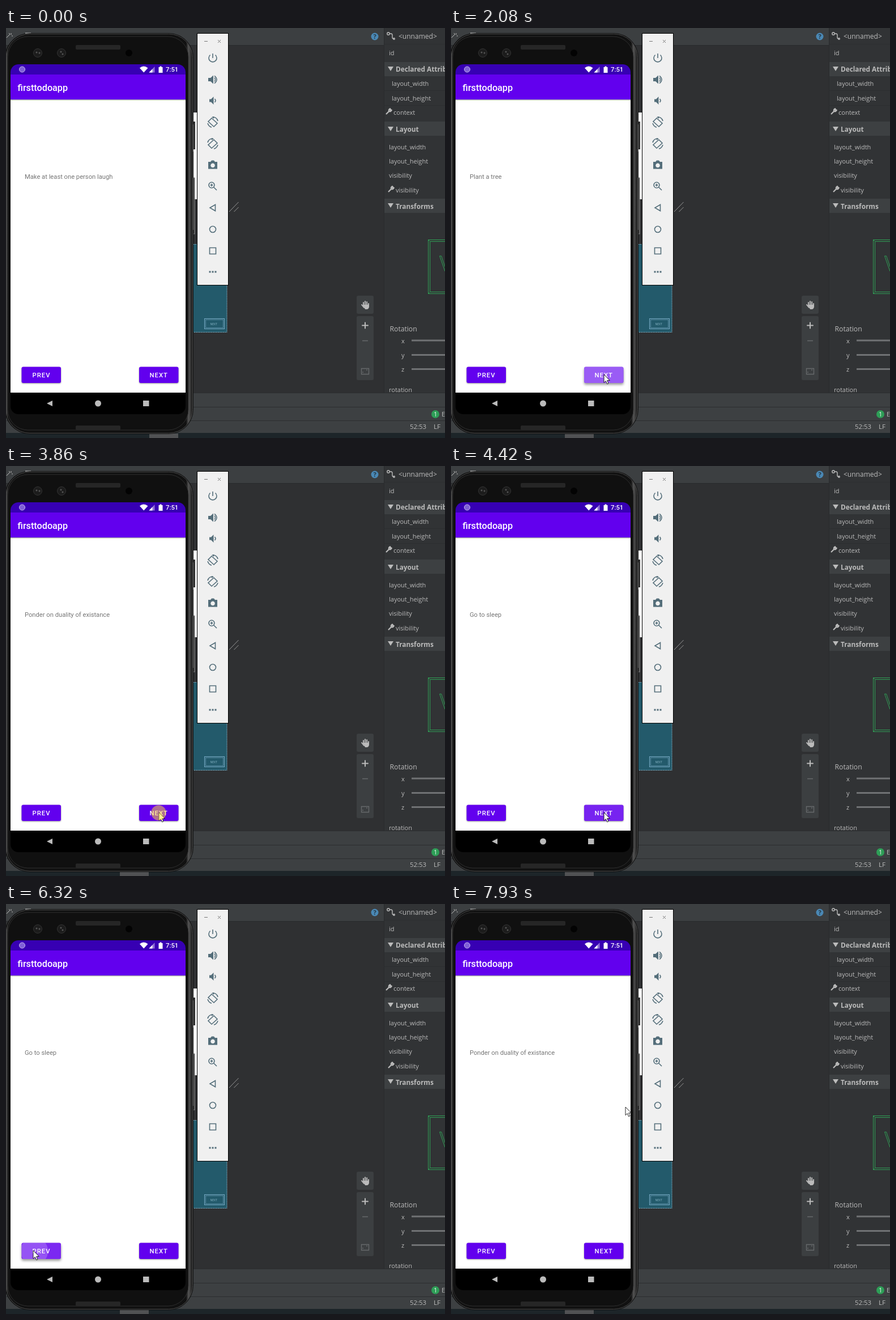
Write an HTML page that moves like this. It is 775 px wide and 723 px high and loops after 8000 ms.

```html
<!DOCTYPE html>
<html>
<head>
<meta charset="utf-8">
<style>
html, body { margin: 0; width: 100%; height: 100%; overflow: hidden; background: #2f3032; }
svg { display: block; }
text { font: 11px "Open Sans", "Noto Sans", sans-serif; fill: #bbb; white-space: pre; }
.app text { font: 500 11.3px Roboto, sans-serif; fill: #fff; }
.app .caps { letter-spacing: 1px; }
.app .title { font-size: 16.2px; }
.app #task { font-size: 11.2px; font-weight: 400; fill: #757575; }
.bold { font-weight: 700; font-size: 11.8px; }
.line { fill: none; stroke: #546e7a; stroke-width: 1.6; }
.solid { fill: #546e7a; }
</style>
</head>
<body>
<svg width="775" height="723" viewBox="0 0 775 723">
  <defs>
    <linearGradient id="rim">
      <stop offset="0" stop-color="#5a5a5a"/><stop offset=".012" stop-color="#111"/>
      <stop offset=".965" stop-color="#111"/><stop offset=".978" stop-color="#555"/>
      <stop offset="1" stop-color="#161616"/>
    </linearGradient>
    <clipPath id="screen"><rect x="8" y="64" width="309" height="617" rx="14"/></clipPath>
  </defs>

  <!-- editor -->
  <rect width="775" height="723" fill="#2f3032"/>
  <rect width="667" height="30" fill="#3c3f41"/>
  <path d="M0 30.5H667" stroke="#282a2c"/>
  <rect x="667" width="108" height="643" fill="#313335"/>
  <path d="M667.5 0V643" stroke="#292b2d"/>
  <g fill="#3d4042">
    <rect x="668" y="60" width="107" height="25"/>
    <rect x="668" y="165" width="107" height="25"/>
    <rect x="668" y="301" width="107" height="25"/>
    <rect y="643" width="775" height="71"/>
  </g>
  <path d="M668 28.5h107M668 110.5h107M668 136.5h107" stroke="#2c2e30"/>
  <path d="M0 643.5H775M0 668.5H775M0 692.5H775" stroke="#2b2d2f"/>
  <rect y="714" width="775" height="9" fill="#1d2529"/>
  <rect id="tab" y="715" width="51" height="8" fill="#505153"/>
  <path d="M1 17l6-6M5 9l2 2M9 9v3M10 14h2" stroke="#bbb"/>
  <path d="M34 9.5h10" stroke="#ddd" stroke-width="2"/>
  <circle cx="651" cy="15" r="6.5" fill="#4a88b5"/>
  <text x="648.4" y="19" style="fill:#263845;font-weight:700">?</text>
  <g fill="none" stroke="#bbb" stroke-width="1.4">
    <circle cx="675" cy="10" r="2.2"/><path d="M677 10h3q2 0 2 3v4q0 2 3 2"/><circle cx="685" cy="19" r="1.3"/>
  </g>
  <g id="labels"></g>
  <path d="M674 68h10l-5 8zM674 174h10l-5 8zM674 309h10l-5 8z" fill="#bbb"/>
  <g fill="none" stroke="#bbb" stroke-width="2.2">
    <path id="wrench" d="M671 152l5-5M680 143l-2.5 2.5M676 147q-1-4 3-5M676 147q4 1 5-3"/>
    <use href="#wrench" x="4" y="137"/>
  </g>
  <g fill="none" stroke="#2f9e55">
    <path d="M780 373.5H745.500V468.500H780M780 376.500H748.500V465.500H780M745 373l3 3M745 469l3-3"/>
    <path d="M775 429l-9.500-27h3l6.500 19"/>
  </g>
  <path d="M716 551h59M716 576.500h59M716 601.500h59" stroke="#707274" stroke-width="3"/>
  <circle cx="758" cy="681" r="7" fill="#2e9e57"/>
  <text x="755.300" y="685" style="fill:#fff;font-size:10px">1</text>

  <!-- zoom controls -->
  <g fill="#3c3f41"><rect x="619" y="472" width="30" height="32" rx="3"/><rect x="619" y="508" width="30" height="113" rx="3"/></g>
  <g fill="none" stroke="#bbb" stroke-width="2" stroke-linecap="round">
    <path d="M631 490v-6M634 490v-8M637 490v-7M640 491v-5M628 488l4 5"/>
    <path d="M629 524.500h10M634 519.500v10"/>
  </g>
  <path d="M630 488h11v4q-1 4-4 4h-3z" fill="#bbb"/>
  <path d="M629 551.500h10M627.500 600.500h13v10h-13zM630 608v-2M638 603h-2" fill="none" stroke="#66696b" stroke-width="1.400"/>

  <!-- layout preview behind the phone -->
  <rect x="325" y="149" width="13" height="153" fill="#fff"/>
  <rect x="325" y="165" width="9" height="49" fill="#333"/>
  <rect x="325" y="264" width="8" height="99" fill="#3a3a3a" stroke="#888"/>
  <rect x="325" y="381.500" width="65" height="155" fill="#235a6b" stroke="#7fabc0" stroke-dasharray="2 1"/>
  <g fill="none" stroke="#78abc5"><rect x="350.500" y="512.500" width="35" height="18"/><rect x="352.500" y="514.500" width="31" height="14" opacity=".6"/></g>
  <text x="360.500" y="524" style="font-size:5px;fill:#8fbccd">NEXT</text>
  <path d="M394 324l16.500-17M402.500 324l8-8" stroke="#999"/>

  <!-- phone -->
  <rect x="-2" y="9" width="333" height="707" rx="44" fill="#0b0b0b"/>
  <rect x="0" y="10.500" width="329.500" height="704" rx="42" fill="url(#rim)" stroke="#4c4c4c"/>
  <rect x="3" y="15" width="319" height="694" rx="36" fill="#101010" stroke="#2e2e2e"/>
  <path d="M330 170v48M330 264v92" stroke="#4a4a4a" stroke-width="2"/>
  <g fill="#262626"><rect x="123" y="30" width="79" height="8" rx="2"/><rect x="123" y="701" width="79" height="8" rx="2"/></g>
  <g fill="#1c1c1c" stroke="#333"><circle cx="56" cy="44" r="7.500"/><circle cx="98" cy="44" r="7.500"/></g>
  <g fill="#555"><circle cx="54" cy="43" r="1.500"/><circle cx="59" cy="44" r="1.500"/><circle cx="97" cy="42" r="1.500"/><circle cx="100" cy="46" r="1.500"/></g>
  <circle cx="217" cy="44" r="6" fill="#030303"/>
  <g class="app">
    <g clip-path="url(#screen)">
      <rect x="8" y="64" width="309" height="617"/>
      <rect x="8" y="126" width="309" height="517" fill="#fff"/>
      <path d="M8 126.500h309" stroke="#aaa"/><path d="M8 127.500h309" stroke="#ddd"/>
      <rect x="8" y="82" width="309" height="44" fill="#6200ee"/>
      <rect x="8" y="64" width="309" height="18" fill="#3700b3"/>
    </g>
    <circle cx="28.500" cy="73" r="5" fill="#8060d8" stroke="#c3b3ee"/>
    <path d="M236 70.500q7-6 14.500 0l-7.250 8zM269.500 69h2v-1.500h3v1.500h2v10h-7z" fill="#fff"/>
    <path d="M252.500 78.500h10v-10.500z" fill="#fff" opacity=".45"/><path d="M252.500 78.500h6v-6.300z" fill="#fff"/>
    <text x="282" y="77">7:51</text>
    <text class="title" x="20.500" y="111">firsttodoapp</text>
    <text id="task" x="33" y="265.500"></text>
    <g id="buttons"></g>
    <path d="M82 657v10l-10-5z" fill="#bbb"/><circle cx="162.500" cy="662" r="5.500" fill="#bbb"/><rect x="242" y="657" width="10.500" height="10" fill="#bbb"/>
  </g>

  <!-- emulator tools -->
  <rect x="337.500" y="9.500" width="55" height="444" fill="#f0f0f0" stroke="#000"/>
  <path d="M350 23.500h6M374 21l5 5M379 21l-5 5" stroke="#777"/>
  <g id="tools"></g>

  <path id="cursor" d="M0 0v14.500l3.300-3.100 2.300 5.300 2.400-1-2.300-5.200h4.600z" fill="#fff" stroke="#111" stroke-width=".9"/>
  <circle id="halo" r="13.300" fill="rgba(255,225,50,.5)"/>
</svg>
<script>
const $ = id => document.getElementById(id);
const clamp = v => Math.max(0, Math.min(1, v));

const labels = [
  [693, 19, '<unnamed>', 12], [676, 48, 'id'], [681, 102, 'layout_width'], [681, 128, 'layout_height'],
  [684, 153, 'context'], [676, 214, 'layout_width'], [676, 239, 'layout_height'], [676, 264, 'visibility'],
  [688, 290, 'visibility'], [677.5, 535, 'Rotation', 12.2], [698, 556, 'x'], [698, 581, 'y'], [698, 606, 'z'],
  [676, 642, 'rotation'], [713, 707, '52:53', 11.4], [755, 707, 'LF', 11.6], [769, 685, 'Event']
];
const headings = [[688, 77, 'Declared Attributes'], [688, 183, 'Layout'], [688, 319, 'Transforms'], [627, 583, '1:1', 10.5]];
const label = cls => ([x, y, s, size]) =>
  `<text class="${cls}" x="${x}" y="${y}" ${size ? `style="font-size:${size}px"` : ''}>${s.replace('<', '&lt;')}</text>`;
$('labels').innerHTML = labels.map(label('')).join('') + headings.map(label('bold')).join('');

// each tool: centre y, stroked path, filled path
const turn = ['M-2-7L8 2L2 8L-8-1ZM0-9q7 0 9 7M-9 2q2 6 7 7', 'M-2-9l4-1v4z'];
const tools = [
  [53, 'M0-8V0M-4.500-5.500A7 7 0 1 0 4.500-5.500'],
  [91, 'M3-3.500q3 3.500 0 7M3-6.700q8 6.700 0 13.400', 'M-8-3h4l5-4.500v15l-5-4.500h-4z'],
  [128, 'M3.500-3q3 3 0 6', 'M-6-2.500h3l4.500-4.500v14l-4.500-4.500h-3z'],
  [166, ...turn], [204, ...turn],
  [241, '', 'M-8-5h4l2-2.500h4l2 2.500h4v12.500h-16zM0-2.500a3.800 3.800 0 1 0 .1 0z'],
  [279, 'M3 -2A5 5 0 1 1 -7 -2A5 5 0 1 1 3 -2M2 2l5 5M-4.500-2h5M-2-4.500v5'],
  [317, 'M4.500-5.500L-5 0L4.500 5.500Z'],
  [355, 'M5.500 0A5.500 5.500 0 1 1-5.500 0A5.500 5.500 0 1 1 5.500 0'],
  [393, 'M-5.500-5.500h11v11h-11z'],
  [430, '', 'M-6.500-1.500h3v3h-3zM-1.500-1.500h3v3h-3zM3.500-1.500h3v3h-3z']
];
$('tools').innerHTML = tools.map(([y, line, solid = '']) =>
  `<g transform="translate(365 ${y}) scale(${y === 204 ? -1 : 1} 1)">
    <path class="line" d="${line}"/><path class="solid" fill-rule="evenodd" d="${solid}"/></g>`).join('');

const buttons = [[27.5, 'PREV', 46.5, 50], [235, 'NEXT', 253.5, 270]];
$('buttons').innerHTML = buttons.map(([x, name, textX, tapX]) => {
  const box = `x="${x}" y="597.500" width="69.500" height="28.500" rx="3"`;
  return `<clipPath id="clip${name}"><rect ${box}/></clipPath>
    <rect id="${name}" ${box} fill="#6200ee"/>
    <g clip-path="url(#clip${name})" fill="#fff">
      <rect id="wash${name}" ${box}/><circle id="ripple${name}" cx="${tapX}" cy="612"/></g>
    <text class="caps" x="${textX}" y="616">${name}</text>`;
}).join('');

// press time, release time, button, task shown after release
const clicks = [
  [1830, 1980, 'NEXT', 'Plant a tree'],
  [2860, 3000, 'NEXT', 'Ponder on duality of existance'],
  [3860, 4000, 'NEXT', 'Go to sleep'],
  [4600, 4900, 'NEXT', 'Wake up'],
  [6160, 6300, 'PREV', 'Go to sleep'],
  [7020, 7160, 'PREV', 'Ponder on duality of existance']
];

// cursor tip: time, x, y
const path = [
  [70, 465, 576], [200, 440, 592], [400, 370, 620], [600, 310, 626], [820, 270, 617], [1130, 270, 611],
  [5400, 270, 611], [5630, 64, 607], [5780, 48, 611], [7480, 48, 611], [7770, 263, 405], [7930, 308, 358], [8000, 308, 358]
];
function cursorAt(t) {
  const i = Math.max(1, path.findIndex(p => p[0] > t));
  const [a, b] = [path[i - 1], path[i]];
  const k = clamp((t - a[0]) / (b[0] - a[0]));
  return [a[1] + (b[1] - a[1]) * k, a[2] + (b[2] - a[2]) * k];
}

function drawButton(name, t) {
  const click = clicks.findLast(c => c[2] === name && c[0] <= t);
  const age = click ? t - click[1] + 80 : 1e4;
  const fade = clamp((640 - age) / 390);
  $('wash' + name).setAttribute('opacity', 0.2 * clamp(age / 130) * fade);
  $('ripple' + name).setAttribute('opacity', 0.2 * fade);
  $('ripple' + name).setAttribute('r', Math.max(0, Math.min(75, age * 0.24)));
  const lift = clamp((age + 80) / 100) * clamp((450 - age) / 150);
  $(name).style.filter = `drop-shadow(0 ${1 + lift * 2}px ${1 + lift}px rgba(0,0,0,.4))`;
}

function draw(now) {
  const t = now % 8000;
  const [x, y] = cursorAt(t);
  const done = clicks.findLast(c => c[1] <= t);
  const pressed = clicks.some(c => t >= c[0] && t < c[1]);
  $('task').textContent = done ? done[3] : 'Make at least one person laugh';
  $('tab').setAttribute('x', done ? 201 : 253);
  $('cursor').setAttribute('transform', `translate(${x} ${y})`);
  $('cursor').setAttribute('opacity', t < 70 ? 0 : 1);
  $('halo').setAttribute('transform', `translate(${x - 0.5} ${y + 0.5})`);
  $('halo').setAttribute('opacity', pressed ? 1 : 0);
  drawButton('PREV', t);
  drawButton('NEXT', t);
  requestAnimationFrame(() => draw(performance.now() - start));
}
const start = performance.now();
draw(0);
</script>
</body>
</html>
```
